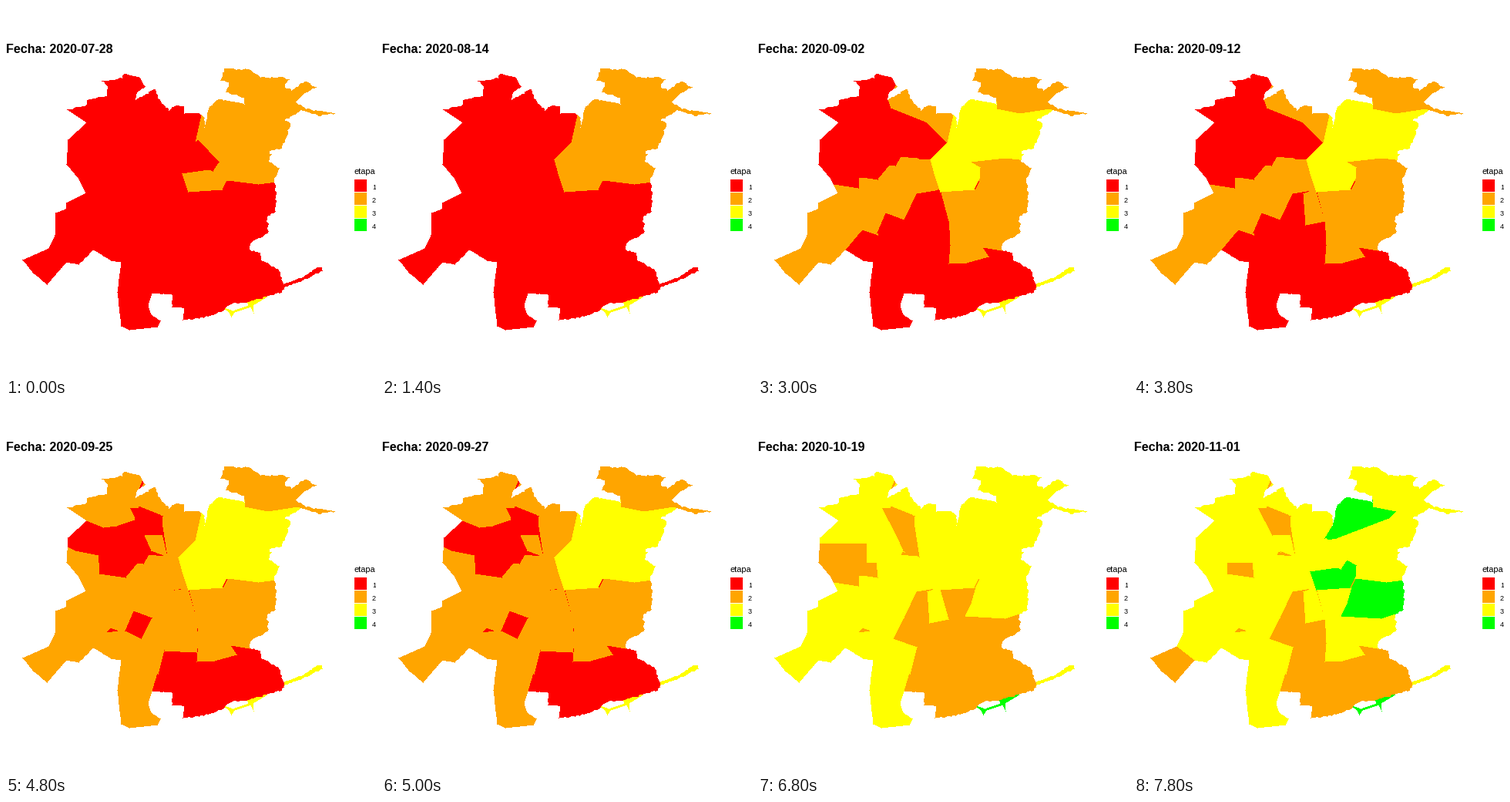
A matplotlib script that plays this animation: 480x480 px, repeating every 8000 ms.

```python
import random

import matplotlib.pyplot as plt
import numpy as np
from matplotlib.animation import FuncAnimation
from matplotlib.colors import to_rgb
from matplotlib.patches import Rectangle
from matplotlib.path import Path

SIZE, DPI = 480, 100
FRAMES, INTERVAL = 40, 200
DAYS_PER_FRAME = 2.465
START = np.datetime64("2020-07-28")
PALETTE = np.array([to_rgb(c) for c in
                    ("white", "red", "orange", "yellow", "lime")])
FONT = "Liberation Sans"

rng = random.Random(7)
ys, xs = np.mgrid[:SIZE, :SIZE]
grid = np.column_stack([xs.ravel(), ys.ravel()])


def inside(pts):
    return Path(pts).contains_points(grid).reshape(SIZE, SIZE)


def coast(amp, *pts, step=3):
    """Polyline through key points with seeded raggedness in between."""
    out = [pts[0]]
    for a, b in zip(pts, pts[1:]):
        n = max(1, round(np.hypot(b[0] - a[0], b[1] - a[1]) / step))
        for k in range(1, n + 1):
            wobble = amp * (k < n)
            out.append(tuple(p + (q - p) * k / n + rng.uniform(-wobble, wobble)
                             for p, q in zip(a, b)))
    return out


# Outline of the whole region, clockwise
west = coast(
    0, (21, 329), (55, 314), (63, 297), (64, 268), (77, 263), (78, 255),
    (103, 242), (94, 224), (78, 205), (80, 173), (104, 151), (79, 134))
north = coast(
    1, (79, 134), (104, 128), (104, 121), (131, 116), (131, 103), (124, 97),
    (150, 93), (153, 87), (172, 92), (180, 104), (171, 110), (168, 121),
    (193, 107), (199, 121), (211, 135), (221, 128), (230, 129), (231, 139),
    (250, 139), (257, 145), (257, 157), (264, 130), (276, 120), (309, 127))
north_east = coast(
    1.2, (309, 119), (285, 111), (289, 99), (278, 96), (283, 81), (315, 82),
    (330, 92), (359, 92), (367, 95), (361, 104), (370, 109), (388, 97),
    (402, 105), (388, 112), (375, 124), (389, 133), (426, 139), (405, 142),
    (383, 134))
east = coast(
    1.3, (375, 140), (361, 148), (368, 152), (364, 168), (357, 184),
    (341, 188), (344, 192), (340, 200), (354, 210), (347, 228), (350, 244),
    (349, 266), (339, 272), (339, 294), (318, 306), (316, 316), (329, 320),
    (331, 330), (352, 340), (360, 360))
south = coast(
    1, (360, 360), (386, 351), (403, 339), (410, 338), (410, 343), (396, 350),
    (382, 357), (361, 364), (357, 371), (312, 384), (292, 386), (279, 396),
    (250, 405), (229, 407))
south_west = coast(
    .3, (231, 391), (215, 390), (215, 374), (189, 372), (184, 389), (188, 400),
    (200, 408), (196, 416), (160, 420), (149, 415), (144, 371), (149, 332),
    (136, 330), (113, 316), (94, 335), (78, 332), (53, 361), (34, 345),
    (21, 329))

land = inside(west + north + north_east + east + south + south_west)
labels = np.zeros((SIZE, SIZE), int)
plans = []


def district(start, ups, *pts, down="99", where=land):
    """Paint a district over earlier ones; it gains a stage on each date."""
    plans.append((start, ups.split(), down))
    labels[where & (inside(pts) if pts else True)] = len(plans)


# South, on top of a base that fills the whole region
district(1, "09-28")
district(3, "10-19", (279, 390), (294, 395), (314, 388), (310, 376),
         (340, 376), (320, 388), (321, 398), (317, 390), (296, 397),
         (292, 403), (289, 397), where=~land)
district(1, "08-17 08-31", (360, 366), (362, 345), (420, 330), (420, 350))
district(1, "09-21 10-12", (100, 300), (175, 290), (206, 315), (189, 372),
         (210, 425), (130, 425))
district(1, "08-31 10-26", (247, 270), (360, 250), (360, 300), (316, 317),
         (291, 313), (299, 325), (270, 333), (247, 334), (249, 310))
district(1, "09-14", (205, 243), (225, 240), (247, 279), (249, 310),
         (247, 322), (205, 320), (206, 315), (175, 304), (189, 277))
district(1, "09-14 10-05", (173, 304), (206, 315), (197, 350), (160, 338))

# Centre and west
district(1, "08-17 09-28", (125, 215), (180, 195), (223, 198), (235, 238),
         (205, 243), (189, 277), (165, 268), (155, 297), (120, 285))
district(1, "09-28 10-19", (165, 268), (189, 277), (175, 304), (154, 294))
district(1, "08-31 10-12", (50, 220), (139, 238), (138, 250), (121, 275),
         (136, 277), (134, 291), (113, 316), (94, 340), (50, 340))
district(1, "08-24 10-05", (0, 320), (55, 314), (78, 332), (50, 370),
         down="10-20")
district(1, "09-21 10-26", (70, 170), (141, 180), (155, 224), (130, 222),
         (130, 236), (98, 231), (70, 231))
district(1, "09-28 10-19", (60, 140), (170, 140), (190, 192), (155, 175),
         (138, 180), (60, 180))
district(1, "09-28 10-05", (138, 179), (155, 175), (188, 190), (178, 207),
         (170, 206), (155, 224), (140, 204))
district(1, "09-28 10-26", (70, 180), (141, 180), (140, 205), (120, 205),
         (120, 196), (90, 190))
district(1, "09-28", (120, 205), (153, 205), (155, 225), (121, 220))

# North
district(1, "09-14 10-05", (200, 140), (265, 165), (223, 199), (209, 198))
district(1, "09-21 10-05", (60, 75), (185, 75), (168, 121), (172, 132),
         (166, 150), (143, 158), (126, 160), (104, 151), (60, 151))
district(1, "08-24 09-28", (168, 121), (185, 90), (262, 100), (257, 157),
         (245, 177), (219, 151), (172, 132))
district(1, "09-14 10-26", (179, 170), (202, 168), (209, 198), (188, 190))
district(1, "09-28", (160, 134), (173, 134), (203, 145), (202, 169),
         (179, 170))

# East
district(2, "09-02", (245, 177), (262, 100), (400, 130), (400, 200),
         (276, 202))
district(2, "09-28", (270, 60), (430, 60), (430, 146), (405, 144), (378, 133),
         (339, 139), (309, 134), (309, 123), (270, 112))
district(2, "09-02 10-26", (245, 177), (257, 157), (262, 110), (309, 124),
         (309, 133), (339, 139), (330, 148), (262, 174))
district(2, "09-21", (276, 202), (320, 197), (365, 202), (365, 227),
         (327, 231), (280, 226))
district(1, "08-31 09-28 10-26", (287, 226), (327, 231), (365, 226),
         (365, 266), (339, 272), (320, 278), (268, 275), (282, 237))
district(1, "08-31 10-26", (236, 238), (282, 237), (276, 258), (268, 275),
         (247, 279))
district(1, "09-07 10-19", (219, 243), (235, 237), (247, 279), (222, 284))
district(1, "08-03 09-02", (223, 199), (249, 173), (276, 202), (268, 215),
         (228, 217))
district(2, "09-02 10-26", (228, 217), (262, 212), (268, 214), (276, 202),
         (288, 209), (287, 223), (280, 238), (236, 241))


def px(size):
    return size * 72 / DPI


fig = plt.figure(figsize=(SIZE / DPI, SIZE / DPI), dpi=DPI, facecolor="white")
ax = fig.add_axes([0, 0, 1, 1])
ax.axis("off")
region = ax.imshow(PALETTE[np.minimum(labels, 1)], interpolation="nearest",
                   extent=(0, SIZE, SIZE, 0), aspect="auto")

title = ax.text(0, 61, "", family=FONT, weight="bold", size=px(16.1))
ax.text(452, 218, "etapa", family=FONT, size=px(11))
for stage in range(1, 5):
    top = 208 + 17 * stage
    ax.add_patch(Rectangle((452, top), 16, 16, lw=0, color=PALETTE[stage],
                           antialiased=False))
    ax.text(475, top + 13, str(stage), family=FONT, size=px(9))


def update(i):
    day = str(START + int(i * DAYS_PER_FRAME))
    title.set_text(f"Fecha: {day}")
    today = day[5:]
    stages = [0] + [start + sum(today >= d for d in ups) - (today >= down)
                    for start, ups, down in plans]
    region.set_data(PALETTE[np.array(stages)[labels]])
    return []


anim = FuncAnimation(fig, update, frames=FRAMES, interval=INTERVAL,
                     repeat=True, repeat_delay=0, blit=False)
plt.show()
```
